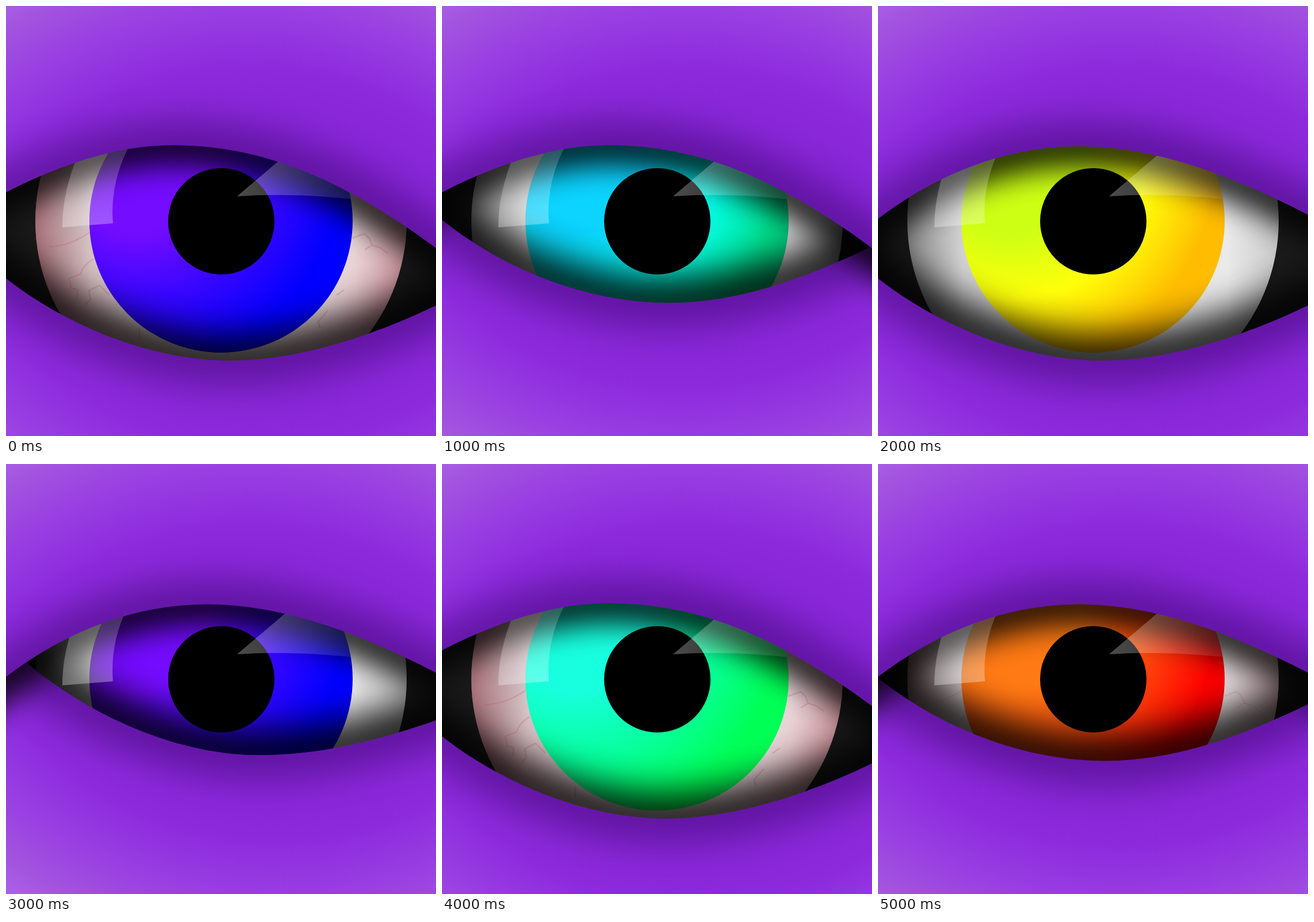
Write an HTML page that moves like this. It is 748x748 px and loops after 6000 ms.

```html
<!DOCTYPE html>
<html lang="en">
<head>
<meta charset="utf-8">
<title>Eye</title>
<style>
  html, body { margin: 0; width: 100%; height: 100%; overflow: hidden; background: #8c2ad8; }
  svg { display: block; width: 100vw; height: 100vh; }
</style>
</head>
<body>
<svg viewBox="0 0 748 748">
  <defs>
    <filter id="soft" filterUnits="userSpaceOnUse" x="-250" y="-250" width="1250" height="1250" color-interpolation-filters="sRGB">
      <feGaussianBlur stdDeviation="31"/>
    </filter>
    <filter id="tight" filterUnits="userSpaceOnUse" x="-250" y="-250" width="1250" height="1250" color-interpolation-filters="sRGB">
      <feGaussianBlur stdDeviation="25"/>
    </filter>
    <radialGradient id="skinTop" gradientUnits="userSpaceOnUse" r="820">
      <stop offset=".55" stop-color="#8424d2"/>
      <stop offset=".72" stop-color="#8c2adc"/>
      <stop offset=".84" stop-color="#983ee2"/>
      <stop offset=".95" stop-color="#a254de"/>
      <stop offset="1" stop-color="#aa5ee8"/>
    </radialGradient>
    <radialGradient id="skinLow" href="#skinTop" gradientUnits="userSpaceOnUse" r="820"/>
    <linearGradient id="white" gradientUnits="userSpaceOnUse" x1="51" x2="697" y1="0" y2="0">
      <stop offset="0" stop-color="#8a8a8a"/>
      <stop offset=".15" stop-color="#d2d2d2"/>
      <stop offset=".86" stop-color="#eaeaea"/>
      <stop offset="1" stop-color="#c8c8c8"/>
    </linearGradient>
    <radialGradient id="flush" gradientUnits="userSpaceOnUse" cx="374" cy="374" r="323">
      <stop offset=".7" stop-color="#e08c98" stop-opacity=".2"/>
      <stop offset="1" stop-color="#dc5468" stop-opacity=".42"/>
    </radialGradient>
    <radialGradient id="hue" gradientUnits="userSpaceOnUse" cx="230" cy="270" r="360">
      <stop offset=".34"/><stop offset=".66"/><stop offset="1"/>
    </radialGradient>
    <linearGradient id="glintL" gradientUnits="userSpaceOnUse" x1="0" x2="0" y1="245" y2="385">
      <stop offset="0" stop-color="#fff" stop-opacity=".15"/>
      <stop offset="1" stop-color="#fff" stop-opacity=".31"/>
    </linearGradient>
    <linearGradient id="glintR" gradientUnits="userSpaceOnUse" x1="402" x2="603" y1="0" y2="0">
      <stop offset="0" stop-color="#fff" stop-opacity=".3"/>
      <stop offset=".4" stop-color="#fff" stop-opacity=".21"/>
      <stop offset="1" stop-color="#fff" stop-opacity=".08"/>
    </linearGradient>
    <clipPath id="clipTop"><path class="topLid"/></clipPath>
    <clipPath id="clipLow"><path class="lowLid"/></clipPath>
    <clipPath id="clipIris"><circle cx="374" cy="374" r="229"/></clipPath>
  </defs>

  <rect width="748" height="748" fill="#1b1b1b"/>
  <circle cx="374" cy="374" r="323" fill="url(#white)"/>
  <g id="pink">
    <circle cx="374" cy="374" r="323" fill="url(#flush)"/>
    <g fill="none" stroke="#cc5a6a" stroke-opacity=".27" stroke-width="2.4" stroke-linejoin="round">
      <path d="M75 419Q112 417 145 394M152 440Q133 452 130 466L110 474 113 490 125 494 123 508M180 503L163 486 144 495 147 511 138 520M232 560V580"/>
      <path d="M602 404L624 396 632 404 637 416 652 421 665 431M637 416L624 424M588 494L575 503M560 530L543 549 546 560"/>
    </g>
  </g>
  <circle cx="374" cy="374" r="229" fill="url(#hue)"/>
  <circle cx="374.5" cy="374.5" r="92.5"/>

  <path class="lowEdge" fill="none" stroke="#000" stroke-width="88" opacity=".88" filter="url(#soft)"/>
  <path class="lowLid" fill="url(#skinLow)"/>
  <g clip-path="url(#clipLow)">
    <path class="lowEdge" fill="none" stroke="#300060" stroke-width="80" opacity=".45" filter="url(#soft)"/>
  </g>

  <path class="topEdge" fill="none" stroke="#000" stroke-width="72" opacity=".84" filter="url(#tight)"/>
  <path d="M98 385Q98 325 124 262L140 230H222Q180 300 186 378Z" fill="url(#glintL)"/>
  <path d="M402 331L475 269 520 230H620V338Q500 324 402 331Z" fill="url(#glintR)" clip-path="url(#clipIris)"/>
  <path class="topLid" fill="url(#skinTop)"/>
  <g clip-path="url(#clipTop)">
    <path class="topEdge" fill="none" stroke="#300060" stroke-width="80" opacity=".45" filter="url(#soft)"/>
  </g>
</svg>
<script>
const HOLD = 1000;

// Lid edges run past the stage so their blurred shading stays even at the sides.
const tops = {
  tilted: { d: "M-100 371L0 324C95 275 195 242 290 242C450 242 590 304 748 421L848 495", at: [420, 700] },
  level: { d: "M-100 446L0 370C115 283 235 244 350 244C490 244 630 302 748 363L848 414", at: [420, 700] }
};
const lows = {
  open: { d: "M-100 400L0 474C110 560 258 617 388 617C510 617 640 573 748 521L848 473", at: [440, 170] },
  half: { d: "M-100 292L0 372C115 465 262 516.5 395 516.5C520 516.5 640 470 748 418L848 370", at: [420, 70] },
  squint: { d: "M-100 234L36 346C150 441 300 506.5 440 506.5C550 506.5 650 480 748 446L848 411", at: [470, 60] }
};
const violet = ["#740cff", "#3806ff", "#0000ff"];
const poses = [
  { top: "tilted", low: "open", iris: violet, pink: 1 },
  { top: "tilted", low: "half", iris: ["#0cd4ff", "#04fff0", "#00e08c"], pink: 0 },
  { top: "level", low: "open", iris: ["#ccff14", "#ffff0a", "#ffbc00"], pink: 0 },
  { top: "level", low: "squint", iris: violet, pink: 0 },
  { top: "tilted", low: "open", iris: ["#18ffe0", "#08ffa0", "#00ff55"], pink: 1 },
  { top: "level", low: "half", iris: ["#ff7a14", "#ff4a0c", "#ff0000"], pink: .55 }
];

const all = q => document.querySelectorAll(q);
const byId = id => document.getElementById(id);
const hueStops = all("#hue stop");
let shown = -1;

function setLid(name, skin, lid, close) {
  all(`.${name}Edge`).forEach(p => p.setAttribute("d", lid.d));
  all(`.${name}Lid`).forEach(p => p.setAttribute("d", lid.d + close));
  const g = byId(skin);
  g.setAttribute("cx", lid.at[0]);
  g.setAttribute("cy", lid.at[1]);
}

function draw(t) {
  const i = Math.floor(t / HOLD) % poses.length;
  if (i === shown) return;
  shown = i;
  const pose = poses[i];
  setLid("top", "skinTop", tops[pose.top], "V-100H-100Z");
  setLid("low", "skinLow", lows[pose.low], "V848H-100Z");
  pose.iris.forEach((c, k) => hueStops[k].setAttribute("stop-color", c));
  byId("pink").setAttribute("opacity", pose.pink);
}

const start = performance.now();
function tick() {
  draw(performance.now() - start);
  requestAnimationFrame(tick);
}
tick();
</script>
</body>
</html>
```
